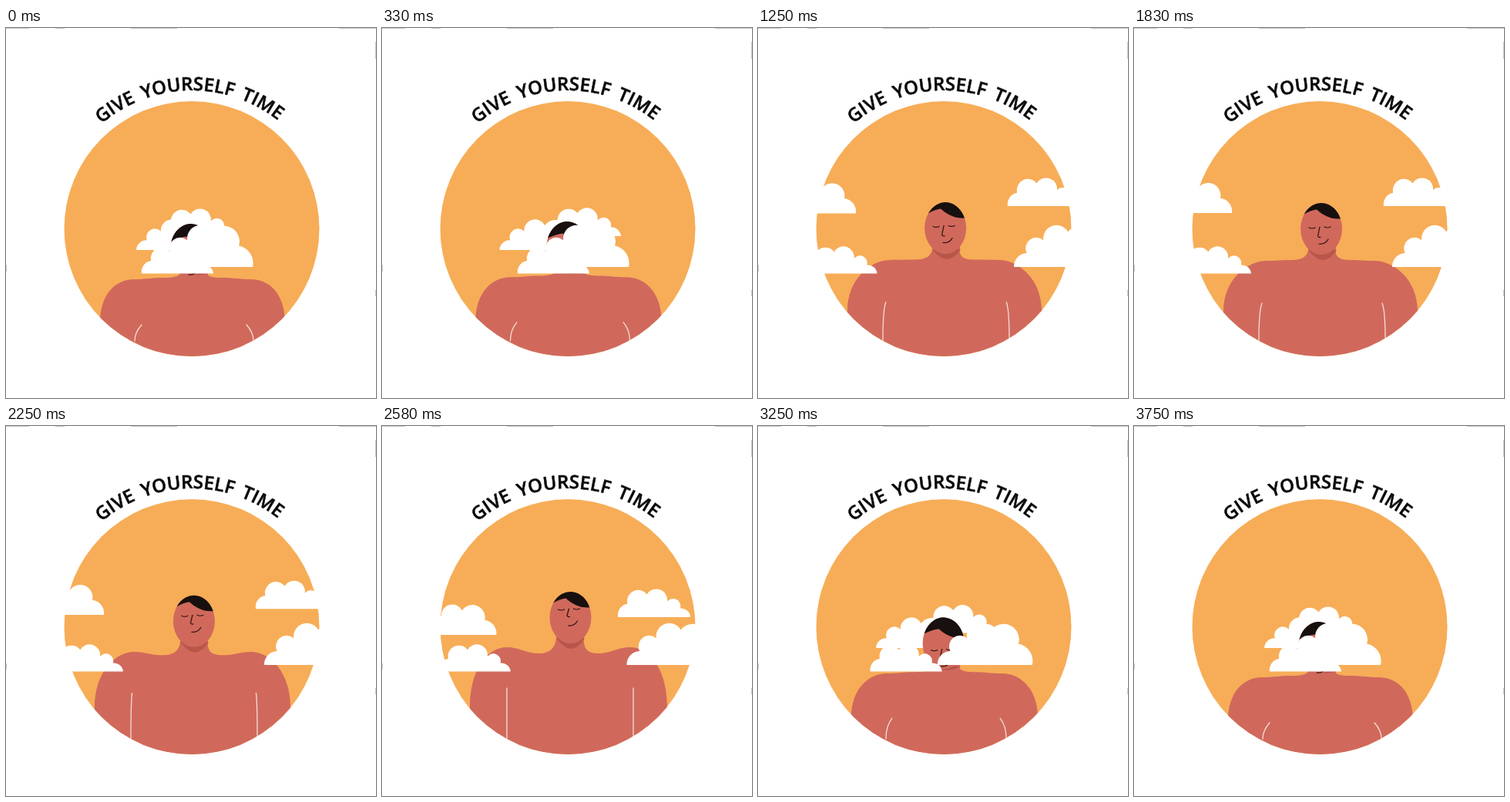
Write an HTML page that moves like this. It is 480 by 480 pixels and loops after 3830 ms.

```html
<!DOCTYPE html>
<html lang="en">
<head>
<meta charset="utf-8">
<title>Give yourself time</title>
<style>
  html, body { margin: 0; width: 100%; height: 100%; overflow: hidden; background: #fff; }
  svg { display: block; width: 480px; height: 480px; }
  text { font: 600 24px "Open Sans", sans-serif; word-spacing: 4px; fill: #0b0909; stroke: #0b0909; stroke-width: .5; stroke-linejoin: round; }
  .sky { fill: #f7ad57; }
  .skin { fill: #d0695c; }
  .shade { fill: #b8564b; }
  .hair { fill: #17100f; }
  .cloud { fill: #fff; }
  .line { fill: none; stroke-linecap: round; stroke-linejoin: round; }
  #arms { stroke: #f6ddd6; stroke-width: 1.3; }
  #face { stroke: #2a1110; stroke-width: 1.2; }
  #edge { stroke: #8a8a8a; fill: none; }
</style>
</head>
<body>
<svg viewBox="0 0 480 480">
  <defs>
    <clipPath id="disc"><circle cx="241" cy="260.5" r="165.5"/></clipPath>
    <path id="arc" d="M61 261A180 180 0 0 1 421 261"/>
  </defs>
  <path id="edge" d="M0 0H30M64 0H76M162 0H222M432 0H480M0 308V316M480 18V40M480 340V348"/>
  <text text-anchor="middle"><textPath href="#arc" startOffset="49.4%">GIVE YOURSELF TIME</textPath></text>
  <circle class="sky" cx="241" cy="260.5" r="165.5"/>
  <path class="cloud" id="backLeft"/>
  <path class="cloud" id="backRight"/>
  <g clip-path="url(#disc)">
    <path class="skin" id="body"/>
    <path class="line" id="arms"/>
  </g>
  <path class="shade" id="shade"/>
  <ellipse class="skin" id="head"/>
  <path class="hair" id="hair"/>
  <path class="line" id="face"/>
  <path class="cloud" id="frontRight"/>
  <path class="cloud" id="frontLeft"/>
</svg>
<script>
const LOOP = 3830, FPS = 12, FRAMES = 46;
const $ = id => document.getElementById(id);
const draw = (id, d) => $(id).setAttribute('d', d);

// Smooth 0 to 1 between two frames.
function ease(f, from, to) {
  const u = Math.min(1, Math.max(0, (f - from) / (to - from)));
  return u * u * (3 - 2 * u);
}
// Goes out to 1, holds, and comes back to 0.
const swing = (f, a, b, c, d) => ease(f, a, b) - ease(f, c, d);

// Valleys between bumps, as fractions of the cloud's width and height.
const steep = [[0, 0], [.135, .3], [.31, .58], [.57, .76], [.855, .46], [1, 0]];
const flat = [[0, 0], [.13, .42], [.4, .72], [.68, .5], [.86, .28], [1, 0]];

function cloud(id, outline, x, y, w, h) {
  const points = outline.map(([u, v]) => [x + u * w, y - v * h]);
  const bumps = points.slice(1).map(([px, py], i) => {
    const chord = Math.hypot(px - points[i][0], py - points[i][1]);
    const outer = i === 0 || i === points.length - 2;
    const r = chord * (outer ? .7 : .51);
    return `A${r} ${r} 0 0 1 ${px} ${py}`;
  });
  draw(id, `M${points[0]}${bumps.join('')}Z`);
}

// "up" raises the bowed figure, "lift" adds the deep breath.
function drawBody(up, lift) {
  const axis = 242, neckX = 244, half = 18;
  const neck = 318 - 30 * up - 13 * lift;
  const dip = 324 - 23 * up - 6 * lift;
  const top = 326 - 24 * up - 15 * lift;
  const shoulder = 76 - 6 * up + 10 * lift;
  const side = 120 + 6 * up + 2 * lift;
  const elbow = 382 - 14 * up - 3 * lift;
  const armX = 68 + 10 * up + 4 * lift, armY = 385 - 28 * up - 17 * lift;
  const wristX = 77 + 5 * up;

  let body = '', arms = '';
  for (const dir of [-1, 1]) {
    const at = (dx, y) => `${axis + dir * dx} ${y} `;
    const arm = (dx, y) => `${neckX + dir * dx} ${y} `;
    body += `M${axis} 440V${neck - 25}H${neckX + dir * half}V${neck}`
      + `Q${at(half, dip)}${at(38, dip)}`
      + `C${at(55, dip)}${at(shoulder - 16, top)}${at(shoulder, top)}`
      + `C${at(shoulder + 24, top)}${at(side, top + .35 * (elbow - top))}${at(side, elbow)}`
      + `L${at(side, 440)}Z`;
    arms += `M${arm(armX, armY)}Q${arm(wristX, armY + 10)}${arm(wristX, 406)}`;
  }
  draw('body', body);
  draw('arms', arms);
  draw('shade', `M${neckX - half} ${neck}Q${neckX + 2} ${neck + 6 + 20 * up + 2 * lift} ${neckX + half + 1} ${neck}Z`);
}

function drawHead(up, lift) {
  const rx = 27, ry = 33.5;
  const x = 240 + 3 * up + 1.5 * lift, top = 254 - 27 * up - 12 * lift;
  const cy = top + ry, eyes = top + 45 - 13 * up - 9 * lift, nose = 12 - 3 * lift;
  const rim = dy => rx * Math.sqrt(1 - (dy / ry) ** 2);
  const drop = 8 * (1 - up), left = drop - 19, right = drop - 13;

  for (const [name, value] of Object.entries({ cx: x, cy, rx, ry })) $('head').setAttribute(name, value);
  draw('hair', `M${x - rim(left)} ${cy + left}A${rx} ${ry} 0 0 1 ${x + rim(right)} ${cy + right}`
    + `C${x + 12} ${cy + right + 1} ${x + 2} ${cy + drop - 18} ${x - 6} ${cy + drop - 25}`
    + `Q${x - 14} ${cy + drop - 24} ${x - rim(left)} ${cy + left}Z`);
  draw('face', `M${x - 16} ${eyes}q4 2 8 0M${x + 4} ${eyes - 1}q4 2 8 0`
    + `M${x - 2} ${eyes - 1}l-2.5 ${nose}q1 2 3.5 1.5M${x - 3} ${eyes + 21}q8 1 12 -6`);
}

function render(now) {
  const f = Math.floor((now % LOOP + 3.4) * FPS / 1000) % FRAMES;
  const front = swing(f, 4.5, 16, 27, 45);
  const back = swing(f, 2, 11.5, 27.5, 42);
  cloud('backLeft', steep, 169 - 145 * back, 288 - 48 * swing(f, 6, 15.5, 25, 35), 103, 42);
  cloud('backRight', flat, 202 + 122 * back, 271 - 40 * swing(f, 3, 13, 22, 42), 94, 41);
  cloud('frontLeft', flat, 176 - 117 * front, 318.5, 93, 39);
  cloud('frontRight', steep, 197 + 138 * front, 310, 123, 60);

  const breath = 2 * swing(f, 3, 10, 31, 41) - swing(f, 10, 16, 23, 30);
  const up = Math.min(breath, 1), lift = Math.max(breath - 1, 0);
  drawBody(up, lift);
  drawHead(up, lift);
}

const start = performance.now();
function tick() {
  render(performance.now() - start);
  requestAnimationFrame(tick);
}
tick();
</script>
</body>
</html>
```
